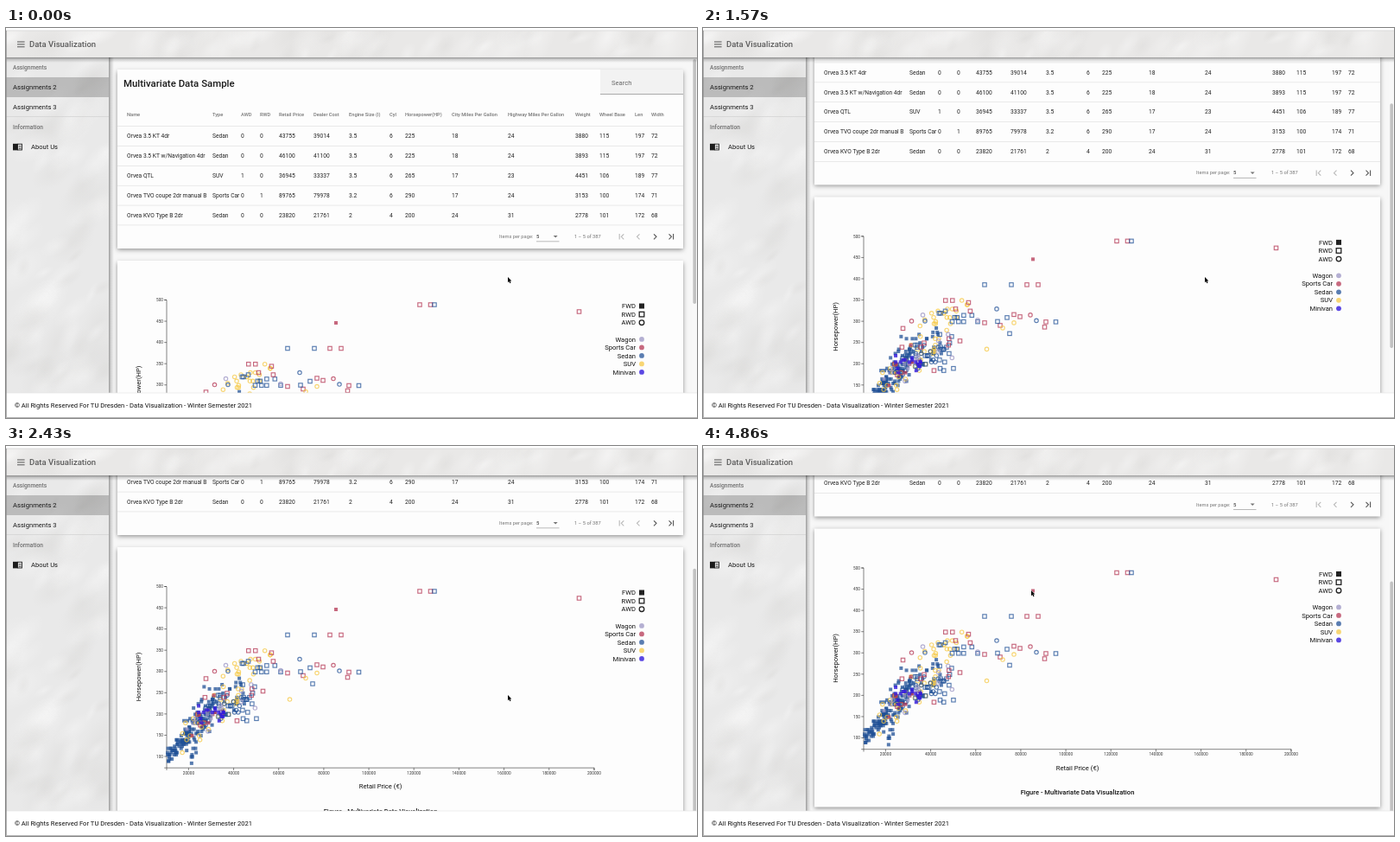
These frames come from a looping animation (800x451 px, 5010 ms). An HTML page with a canvas:

```html
<!DOCTYPE html>
<html lang="en">
<head>
<meta charset="utf-8">
<title>Data Visualization</title>
<style>
html, body { margin: 0; width: 100%; height: 100%; overflow: hidden; background: #fff; }
canvas { display: block; width: 800px; height: 451px; }
</style>
</head>
<body>
<canvas id="stage"></canvas>
<script>
const W = 800, H = 451, LOOP = 5010, STEP = 1000 / 7, LAST = 34;
const FONT = 'Roboto, Arial, sans-serif';
const END_SCROLL = 173.5;
const canvas = document.getElementById('stage');
const dpr = window.devicePixelRatio || 1;
canvas.width = W * dpr;
canvas.height = H * dpr;
const c = canvas.getContext('2d');

const COLOR = {
  wagon: 'rgba(155,148,195,.75)', sports: 'rgba(178,50,80,.73)', sedan: 'rgba(32,80,150,.74)',
  suv: 'rgba(246,200,70,.75)', minivan: 'rgba(50,25,220,.8)'
};

// decelerating 0..1 between two times
function ease(t, from, to, power) {
  const u = Math.min(1, Math.max(0, (t - from) / (to - from)));
  return 1 - Math.pow(1 - u, power);
}
const scrollAt = t => 152 * ease(t, 1290, 2430, 2.35) + 21.5 * ease(t, 2430, 3430, 2);
const pointerAt = t => [581 - 201 * ease(t, 3430, 4570, 4.3), 288 - 121 * ease(t, 3430, 4570, 3.2)];

function seeded(s) {
  return () => {
    s = (s + 0x6D2B79F5) | 0;
    let t = Math.imul(s ^ (s >>> 15), 1 | s);
    t = (t + Math.imul(t ^ (t >>> 7), 61 | t)) ^ t;
    return ((t ^ (t >>> 14)) >>> 0) / 4294967296;
  };
}

function text(str, x, y, size, color, weight = 400, align = 'left') {
  c.font = `${weight} ${size}px ${FONT}`;
  c.fillStyle = color;
  c.textAlign = align;
  c.fillText(str, x, y + size * 0.355);
}

function rect(x, y, w, h, color) {
  c.fillStyle = color;
  c.fillRect(x, y, w, h);
}

function line(color, width, ...pts) {
  c.strokeStyle = color;
  c.lineWidth = width;
  c.beginPath();
  pts.forEach(([x, y], i) => i ? c.lineTo(x, y) : c.moveTo(x, y));
  c.stroke();
}

function fade(x, y, w, h, alpha, down) {
  const g = down ? c.createLinearGradient(0, y, 0, y + h) : c.createLinearGradient(x, 0, x + w, 0);
  g.addColorStop(0, `rgba(0,0,0,${alpha})`);
  g.addColorStop(0.4, `rgba(0,0,0,${alpha * 0.4})`);
  g.addColorStop(1, 'rgba(0,0,0,0)');
  rect(x, y, w, h, g);
}

// soft stone texture
function marble(w, h, base, count, seed) {
  const m = document.createElement('canvas');
  m.width = w;
  m.height = h;
  const g = m.getContext('2d'), rnd = seeded(seed);
  g.fillStyle = base;
  g.fillRect(0, 0, w, h);
  for (let i = 0; i < count; i++) {
    const tone = rnd() < 0.6 ? '255,255,255' : '212,211,209';
    const r = 12 + rnd() * 30;
    g.save();
    g.translate(rnd() * w, rnd() * h);
    g.rotate(-1.3 + rnd());
    g.scale(1, 0.35 + rnd() * 0.3);
    const f = g.createRadialGradient(0, 0, 0, 0, 0, r);
    f.addColorStop(0, `rgba(${tone},.28)`);
    f.addColorStop(1, `rgba(${tone},0)`);
    g.fillStyle = f;
    g.fillRect(-r, -r, 2 * r, 2 * r);
    g.restore();
  }
  return m;
}
const headerStone = marble(800, 31, '#e9e8e7', 60, 5);
const sideStone = marble(119, 388, '#e9e9e9', 70, 9);

function mark(shape, x, y, color, r = 2.2, lw = 1.15) {
  c.fillStyle = c.strokeStyle = color;
  c.lineWidth = lw;
  if (shape === 'fwd') c.fillRect(x - r, y - r, 2 * r, 2 * r);
  else if (shape === 'rwd') c.strokeRect(x - r, y - r, 2 * r, 2 * r);
  else {
    c.beginPath();
    c.arc(x, y, r, 0, 7);
    shape === 'dot' ? c.fill() : c.stroke();
  }
}

// chart marks, placed as seen when scrolled to the end
const points = [], rnd = seeded(21);
const hpY = hp => 141 + (500 - hp) * 0.49125;
const priceX = price => 211.4 + (price - 20000) * 0.0026083;

// marks scattered about a line, on whole steps of 5 HP
function cloud(kind, shape, n, [x0, y0], [x1, y1], spread) {
  for (let i = 0; i < n; i++) {
    const k = rnd();
    const y = y0 + (y1 - y0) * k + (rnd() + rnd() - 1) * spread;
    points.push([shape, x0 + (x1 - x0) * k, 338 - Math.round((338 - y) / 2.456) * 2.456, COLOR[kind]]);
  }
}
function spots(kind, shape, ...list) {
  list.forEach(([x, y]) => points.push([shape, x, y, COLOR[kind]]));
}
cloud('sedan', 'fwd', 62, [187, 337], [213, 312], 14);
cloud('sedan', 'fwd', 72, [206, 320], [242, 278], 28);
cloud('sedan', 'fwd', 36, [225, 278], [278, 266], 28);
cloud('sedan', 'fwd', 6, [211, 350], [221, 326], 8);
cloud('suv', 'awd', 34, [204, 312], [285, 255], 30);
cloud('suv', 'awd', 20, [245, 252], [309, 220], 16);
cloud('sedan', 'rwd', 28, [235, 284], [290, 272], 26);
cloud('sedan', 'awd', 16, [215, 295], [275, 272], 26);
cloud('sports', 'rwd', 10, [212, 300], [285, 256], 34);
cloud('sports', 'fwd', 6, [215, 300], [262, 278], 24);
cloud('wagon', 'awd', 9, [212, 300], [290, 265], 24);
cloud('wagon', 'fwd', 6, [200, 318], [250, 280], 20);
cloud('minivan', 'fwd', 17, [222, 284], [252, 286], 16);
cloud('sedan', 'rwd', 11, [272, 226], [320, 240], 12);
cloud('sports', 'rwd', 5, [276, 217], [310, 224], 8);
spots('sports', 'rwd', [479, 146.5], [491.5, 146.5], [663.5, 154.5], [375, 197], [388, 197],
  [326, 241], [344, 244], [360, 231.5], [367, 234], [397, 240], [395.5, 246], [297.5, 262], [231.5, 247.5]);
spots('sports', 'fwd', [382, 167.5]);
spots('sports', 'awd', [379, 232], [241.5, 239]);
spots('sedan', 'rwd', [496, 146.5], [326, 197], [357, 197], [341, 239.5], [352, 235], [355, 253.5], [408.5, 240]);
spots('sedan', 'awd', [340, 225], [386, 238.5], [257, 239]);
spots('suv', 'awd', [328.5, 271.5], [360, 241], [347, 247]);
spots('wagon', 'awd', [254.5, 232], [318, 238]);

const COLS = [140, 239, 272, 294, 316, 356, 397, 444, 462, 516, 581, 659, 687, 728, 747];
const HEADS = ['Name', 'Type', 'AWD', 'RWD', 'Retail Price', 'Dealer Cost', 'Engine Size (l)', 'Cyl',
  'Horsepower(HP)', 'City Miles Per Gallon', 'Highway Miles Per Gallon', 'Weight', 'Wheel Base', 'Len', 'Width'];
const ROWS = [
  'Orvea 3.5 KT 4dr|Sedan|0|0|43755|39014|3.5|6|225|18|24|3880|115|197|72',
  'Orvea 3.5 KT w/Navigation 4dr|Sedan|0|0|46100|41100|3.5|6|225|18|24|3893|115|197|72',
  'Orvea QTL|SUV|1|0|36945|33337|3.5|6|265|17|23|4451|106|189|77',
  'Orvea TVO coupe 2dr manual B|Sports Car|0|1|89765|79978|3.2|6|290|17|24|3153|100|174|71',
  'Orvea KVO Type B 2dr|Sedan|0|0|23820|21761|2|4|200|24|31|2778|101|172|68'
].map(r => r.split('|'));

function card(y, h) {
  c.save();
  c.shadowColor = 'rgba(0,0,0,.42)';
  c.shadowBlur = 5 * dpr;
  c.shadowOffsetY = 1.5 * dpr;
  rect(129, y, 655, h, '#fdfdfd');
  c.restore();
}

function chevron(x, y, dir, color, bar) {
  line(color, 1.1, [x - 1.5 * dir, y - 3], [x + 1.5 * dir, y], [x - 1.5 * dir, y + 3]);
  if (bar) line(color, 1.1, [x + 3.6 * dir, y - 3.2], [x + 3.6 * dir, y + 3.2]);
}

function table() {
  card(48, 207);
  text('Multivariate Data Sample', 136, 64.3, 11.43, '#1c1c1c', 500);
  rect(688, 48, 96, 29, '#f2f2f2');
  rect(688, 76.3, 96, 0.7, '#8c8c8c');
  text('Search', 701, 63, 7.62, '#666');
  HEADS.forEach((h, i) => text(h, COLS[i], 100, 5.71, '#757575', 500));
  rect(129, 113.3, 655, 0.6, '#dcdcdc');
  ROWS.forEach((row, r) => {
    const y = 125 + r * 22.86;
    row.forEach((v, i) => text(v, COLS[i], y, 6.67, '#222'));
    rect(129, y + 11.2, 655, 0.6, '#dcdcdc');
  });
  text('Items per page:', 571, 241, 5.71, '#757575');
  text('5', 614, 241, 5.9, '#222');
  rect(614, 246.6, 26.5, 0.6, '#8a8a8a');
  c.fillStyle = '#757575';
  c.beginPath();
  c.moveTo(633.7, 240);
  c.lineTo(638.7, 240);
  c.lineTo(636.2, 242.6);
  c.fill();
  text('1 – 5 of 387', 658, 241, 5.71, '#757575');
  chevron(713.8, 241.3, -1, '#b9b9b9', true);
  chevron(732, 241.3, -1, '#b9b9b9');
  chevron(751.5, 241.3, 1, '#555');
  chevron(769, 241.3, 1, '#555', true);
}

function chart() {
  card(95.5, 322);
  const ink = '#333';
  line(ink, 0.6, [183.2, 141], [186, 141], [186, 350.7], [183.2, 350.7]);
  line(ink, 0.6, [186, 353.5], [186, 350.7], [681, 350.7], [681, 353.5]);
  for (let hp = 100; hp <= 500; hp += 50) {
    line(ink, 0.6, [183.2, hpY(hp)], [186, hpY(hp)]);
    text(hp, 182, hpY(hp), 4.76, ink, 400, 'right');
  }
  for (let p = 20000; p <= 200000; p += 20000) {
    line(ink, 0.6, [priceX(p), 350.7], [priceX(p), 353.5]);
    text(p, priceX(p), 356.8, 4.76, ink, 400, 'center');
  }
  c.save();
  c.translate(153, 245.5);
  c.rotate(-Math.PI / 2);
  text('Horsepower(HP)', 0, 0, 7.62, '#111', 400, 'center');
  c.restore();
  text('Retail Price (€)', 433.5, 372, 7.62, '#111', 400, 'center');
  text('Figure - Multivariate Data Visualization', 433.5, 400.6, 7.62, '#111', 500, 'center');
  points.forEach(([s, x, y, color]) => mark(s, x, y, color, s === 'fwd' ? 2 : 2.2));
  ['fwd', 'rwd', 'awd'].forEach((s, i) => {
    const y = 148 + i * 9.6;
    text(s.toUpperCase(), 729, y, 7.62, '#111', 400, 'right');
    mark(s, 736, y, '#222', s === 'fwd' ? 3 : 2.8, 1.3);
  });
  ['Wagon', 'Sports Car', 'Sedan', 'SUV', 'Minivan'].forEach((name, i) => {
    const y = 186.4 + i * 9.5;
    text(name, 729, y, 7.62, '#111', 400, 'right');
    mark('dot', 736, y, COLOR[name.split(' ')[0].toLowerCase()], 2.9);
  });
}

function sidebar() {
  c.drawImage(sideStone, 0, 34);
  rect(0, 57, 119, 23, 'rgba(0,0,0,.2)');
  text('Assignments', 8, 45.5, 6.67, '#707070', 500);
  text('Assignments 2', 8, 68.5, 7.62, '#1c1c1c');
  text('Assignments 3', 8, 91.3, 7.62, '#1c1c1c');
  rect(0, 102.2, 119, 0.6, '#cdcdcd');
  text('Information', 8, 114.7, 6.67, '#707070', 500);
  text('About Us', 29, 137.7, 7.62, '#1c1c1c');
  // open book
  rect(8, 133.8, 5.5, 7.6, '#1c1c1c');
  c.strokeStyle = '#1c1c1c';
  c.lineWidth = 0.9;
  c.strokeRect(13.4, 134.2, 5, 6.8);
  for (let i = 0; i < 3; i++) rect(14.7, 136.3 + i * 1.4, 2.8, 0.6, '#1c1c1c');
  fade(119, 34, 6, 388, 0.38, false);
}

function header() {
  rect(0, 0, W, 3, '#fff');
  c.drawImage(headerStone, 0, 3);
  rect(0, 2.6, W, 0.7, '#d2d2d2');
  fade(0, 34, W, 6, 0.4, true);
  for (let i = 0; i < 3; i++) rect(13, 15.5 + i * 2.9, 8.6, 1, '#555');
  text('Data Visualization', 27, 19, 9.52, '#5c5c5c', 500);
}

function pointer(x, y) {
  c.save();
  c.translate(x, y);
  c.beginPath();
  [[0, 0], [0, 6.2], [1.4, 5], [2.4, 7.2], [3.5, 6.7], [2.5, 4.6], [4.4, 4.5]]
    .forEach(([px, py], i) => i ? c.lineTo(px, py) : c.moveTo(px, py));
  c.closePath();
  c.strokeStyle = '#fff';
  c.lineWidth = 1;
  c.stroke();
  c.fillStyle = '#000';
  c.fill();
  c.restore();
}

function draw(t) {
  const scroll = scrollAt(t);
  c.setTransform(dpr, 0, 0, dpr, 0, 0);
  rect(0, 0, W, H, '#f7f7f7');
  c.save();
  c.translate(0, -scroll);
  table();
  c.translate(0, END_SCROLL);
  chart();
  c.restore();
  rect(794, 34, 6, 388, '#f8f8f8');
  c.fillStyle = '#c2c2c2';
  c.beginPath();
  c.roundRect(795.4, 36 + scroll * 0.695, 3.6, 283, 1.8);
  c.fill();
  sidebar();
  header();
  rect(0, 422, W, 29, '#fff');
  rect(0, 421.7, W, 0.6, '#e2e2e2');
  text('© All Rights Reserved For TU Dresden - Data Visualization - Winter Semester 2021',
    10, 436.7, 7.62, '#111');
  rect(0, 3, 0.7, 448, '#8f8f8f');
  rect(0, 450, W, 1, '#b5b5b5');
  pointer(...pointerAt(t));
}

const start = performance.now();
function tick(now) {
  const t = Math.max(0, now - start) % LOOP;
  const step = Math.min(LAST, Math.floor((t + 5) / STEP));
  draw(Math.round(step * STEP / 10) * 10);
  requestAnimationFrame(tick);
}
tick(start);
</script>
</body>
</html>
```
